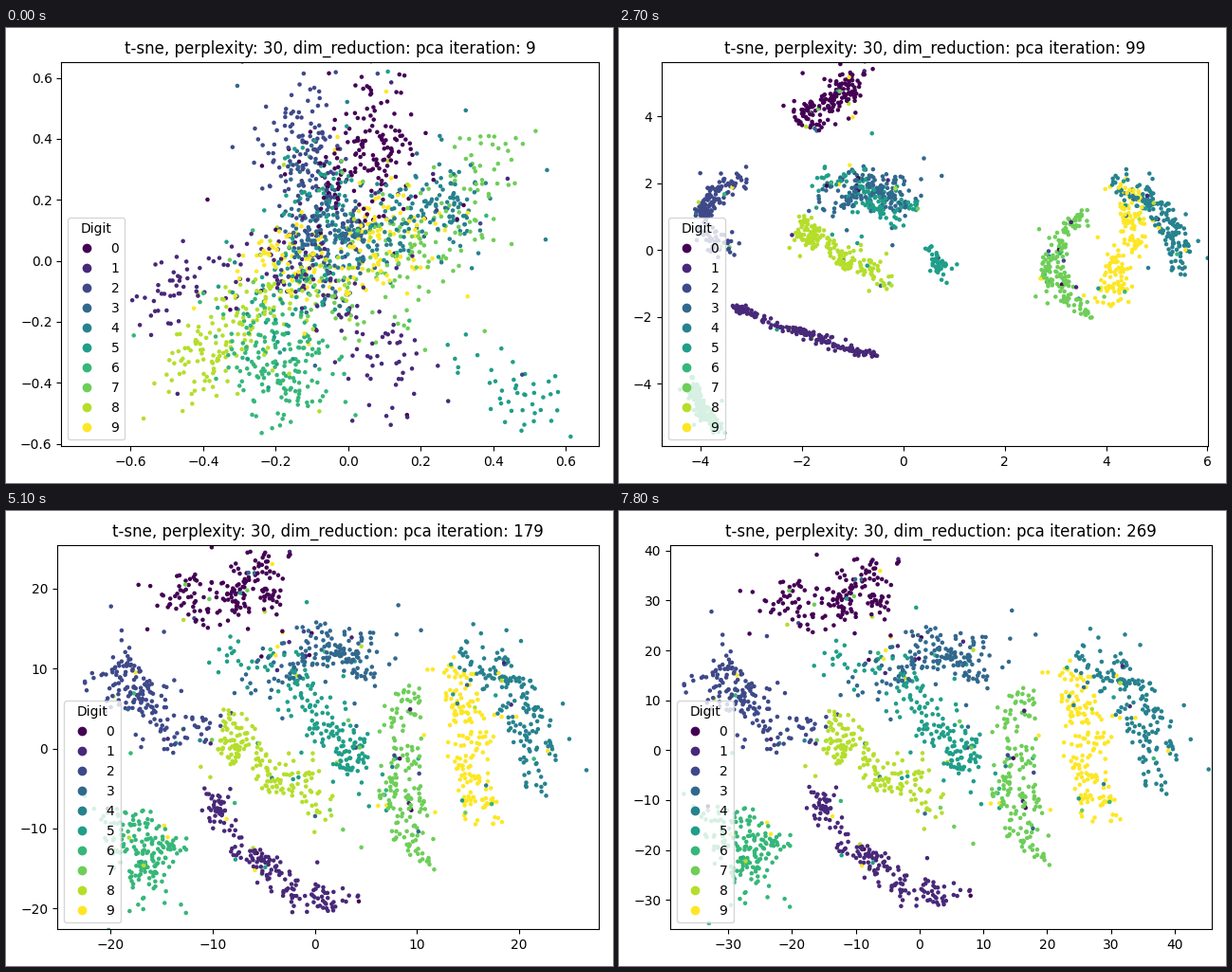
A matplotlib script that plays this animation: 640x480 px, repeating every 8 s.

```python
import numpy as np
import matplotlib.pyplot as plt
from matplotlib.animation import FuncAnimation

W, H = 640, 480
FAST, SLOW = 59, 99  # end of the first burst, end of the compact phase
KEY_ITERS = np.array([9, FAST, SLOW, 149, 269])
rng = np.random.default_rng(7)

digits, tracks = [], []


def along(u, points):
    """Line or parabola through evenly spaced points."""
    n = len(points)
    coefficients = np.polyfit(np.linspace(0, 1, n), np.array(points, float), n - 1)
    return np.vander(u, n) @ coefficients


def cluster(digit, count, cloud, band, shift, settled):
    """Each shape is (half width, *points); shift moves the band while it is compact."""
    centres = count // 3
    pick = rng.integers(centres, size=count)
    u = np.clip(rng.random(centres)[pick] + rng.normal(0, 0.04, count), 0, 1)
    angle, radius = rng.uniform(0, 2 * np.pi, centres), np.sqrt(rng.random(centres))
    offset = np.stack([radius * np.cos(angle), radius * np.sin(angle)], 1)[pick]
    offset += rng.normal(0, 0.22, offset.shape)
    offset[rng.random(count) < 0.06] *= 3

    def place(shape):
        width, *points = shape
        return along(u, points) + width * offset

    start = place(cloud) + rng.normal(0, 12, offset.shape)
    compact = place(band) + rng.normal(0, 1.5, offset.shape)
    final = place(settled)
    drift = (final - (400, 250)) * (0.03, -0.025)
    tracks.append([start, compact, compact + shift, final - drift, final + drift])
    mislabelled = rng.random(count) < 0.05
    digits.append(np.where(mislabelled, rng.integers(10, size=count), digit))


cluster(0, 178, (40, (385, 80), (370, 190)),
        (13, (303, 58), (272, 74), (250, 103)), (-50, 0),
        (28, (285, 70), (235, 87), (188, 102)))
cluster(1, 178, (24, (145, 300), (300, 250), (430, 405)),
        (3, (108, 280), (180, 307), (258, 333)), (12, 14),
        (14, (215, 297), (265, 371), (362, 414)))
cluster(2, 175, (38, (305, 85), (330, 240)),
        (10, (122, 110), (84, 147), (112, 187)), (5, 50),
        (27, (103, 168), (148, 203), (200, 240)))
cluster(3, 178, (40, (325, 150), (345, 245)),
        (18, (190, 192), (232, 170), (280, 185)), (20, -2),
        (24, (245, 195), (318, 147), (385, 165)))
cluster(4, 178, (44, (485, 165), (370, 225)),
        (12, (525, 152), (570, 187), (597, 243)), (0, 8),
        (21, (490, 145), (537, 195), (573, 285)))
cluster(5, 130, (45, (350, 150), (290, 320)),
        (19, (205, 172), (240, 187), (285, 206)), (22, -10),
        (27, (245, 155), (318, 203), (365, 258)))
cluster(5, 48, (34, (470, 380), (580, 385)),
        (7, (333, 265), (344, 280)), (-5, -27),
        (17, (350, 250), (366, 264)))
cluster(6, 178, (42, (265, 320), (310, 385)),
        (6, (118, 375), (120, 398), (143, 422)), (-36, 0),
        (29, (115, 335), (146, 350), (155, 397)))
cluster(7, 178, (42, (520, 130), (450, 225), (350, 285)),
        (11, (487, 185), (453, 237), (490, 283)), (3, 13),
        (22, (428, 195), (417, 285), (440, 356)))
cluster(8, 170, (32, (205, 365), (250, 300), (340, 265)),
        (11, (190, 208), (232, 238), (278, 262)), (2, 1),
        (20, (230, 228), (277, 272), (332, 303)))
cluster(9, 178, (36, (410, 205), (370, 240), (260, 250)),
        (14, (528, 157), (537, 215), (510, 284)), (2, 10),
        (20, (468, 168), (491, 240), (504, 332)))

# Mix the digits so that no cluster always lies on top.
digits = np.concatenate(digits)
order = rng.permutation(len(digits))
tracks = np.concatenate(tracks, axis=1)[:, order] / (W, H)
tracks[..., 1] = 1 - tracks[..., 1]

fig, ax = plt.subplots(figsize=(W / 100, H / 100), dpi=100)
points = ax.scatter(*tracks[0].T, c=digits[order], s=5, cmap="viridis",
                    transform=fig.transFigure)
ax.legend(*points.legend_elements(num=None), loc="lower left", title="Digit")


def settle(iteration):
    """The layout spreads quickly at first, then slows down."""
    t = min((iteration - 9) / (FAST - 9), 1)
    return max(iteration, FAST) if t == 1 else 9 + (FAST - 9) * (1 - (1 - t) ** 2)


def limit(time, first, fast, slow, mid, last):
    """Axis limit: two straight stages, then a parabola that levels off."""
    if time <= SLOW:
        return np.interp(time, [9, FAST, SLOW], [first, fast, slow])
    return np.polyval(np.polyfit([SLOW, 179, 269], [slow, mid, last], 2), time)


def update(frame):
    iteration = 9 + 10 * (frame // 3)
    time = settle(iteration)
    k = min(np.searchsorted(KEY_ITERS, time, side="right"), len(KEY_ITERS) - 1)
    mix = (time - KEY_ITERS[k - 1]) / (KEY_ITERS[k] - KEY_ITERS[k - 1])
    points.set_offsets(tracks[k - 1] * (1 - mix) + tracks[k] * mix)

    ax.set_xlim(limit(time, -0.791, -4.32, -4.767, -25.25, -39.1),
                limit(time, 0.6915, 5.468, 6.01, 27.8, 45.8))
    ax.set_ylim(limit(time, -0.608, -6.145, -5.87, -22.6, -35.9),
                limit(time, 0.653, 5.407, 5.63, 25.5, 41.2))
    ax.set_title(f"t-sne, perplexity: 30, dim_reduction: pca iteration: {iteration}")
    fig.subplots_adjust(left=0.125, right=0.9, bottom=0.11, top=0.88)
    fig.tight_layout()
    fig.subplots_adjust(top=1 - 35.5 / H)
    return points,


anim = FuncAnimation(fig, update, frames=80, interval=100, repeat=True, repeat_delay=0)
plt.show()
```
